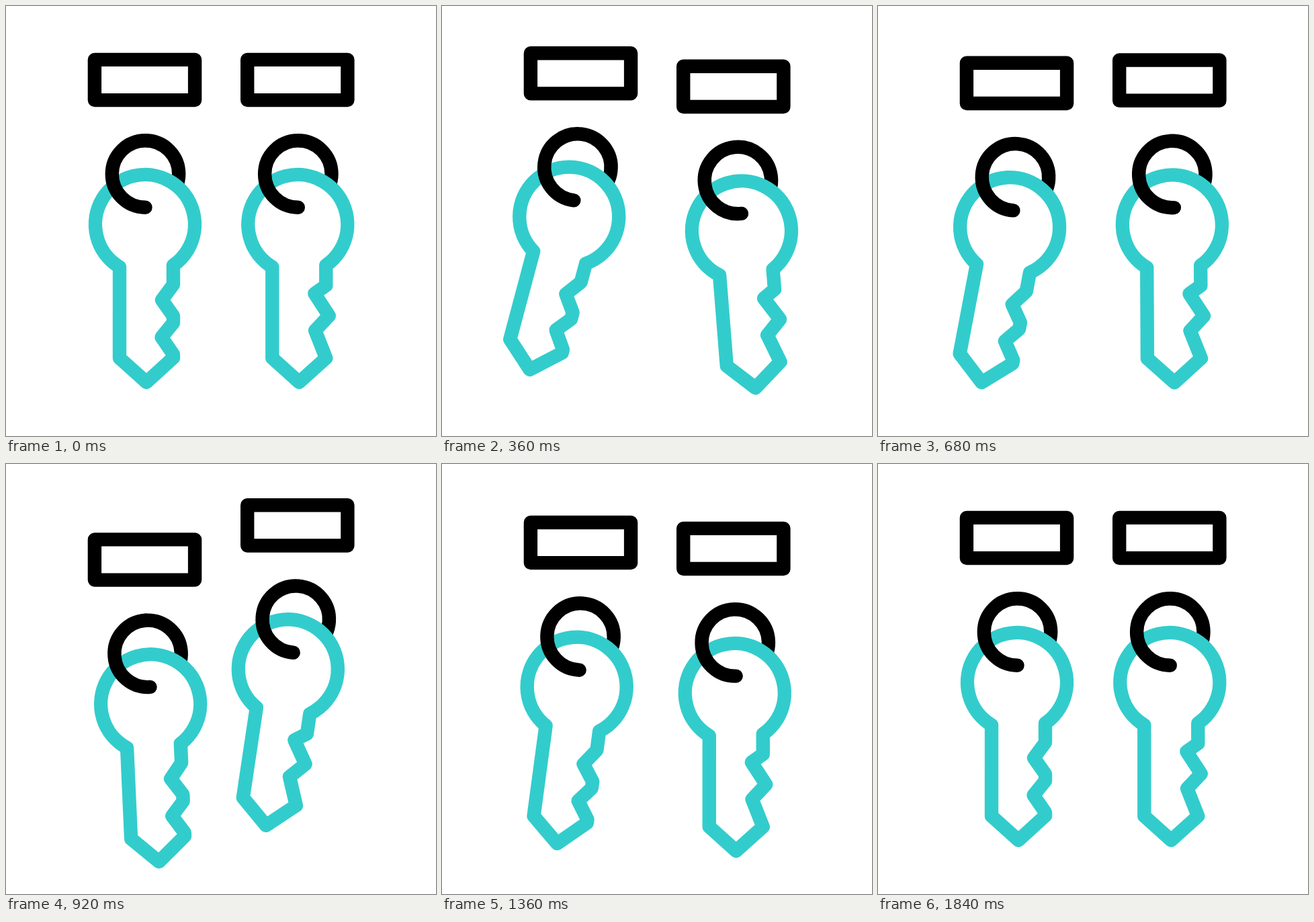
Recreate the animation shown at these times as an HTML page with a canvas. Size 640 by 640 pixels, loop 2 s.

```html
<!DOCTYPE html>
<html lang="en">
<head>
<meta charset="utf-8">
<title>Swinging keys</title>
<style>
  html, body { margin: 0; width: 100%; height: 100%; overflow: hidden; background: #fff; }
  canvas { display: block; width: 100vmin; height: 100vmin; }
</style>
</head>
<body>
<canvas id="stage" width="640" height="640"></canvas>
<script>
const ctx = document.getElementById('stage').getContext('2d');
const LOOP = 2000, STEP = 40;
const BLACK = '#000', TEAL = '#33cccc';
const RAD = Math.PI / 180;
const TIMES = [80, 480, 960, 1400, 1840];

// Each list holds the value at the matching entry of TIMES.
const sets = [
  {
    x: 0,
    lift: [0, -12.4, 33.4, 6.4, 0],
    ring: [0, 8.2, -4.3, 1.8, 0],
    key: [0, 19.05, -3, 7.9, 0],
    pivot: 299,
    teeth: [[249, 414.5], [232, 437.5], [249, 461.5], [249, 471.5],
            [231.5, 493], [249, 518.5], [249, 523.5]]
  },
  {
    x: 227.3,
    lift: [0, 12.6, -19.3, 16.8, 0],
    ring: [0, -8.2, 4.3, -1.8, 0],
    key: [0, -5.8, 8.8, -0.2, 0],
    pivot: 252,
    teeth: [[249, 416], [232, 428], [253.5, 461], [232.8, 483], [249, 524]]
  }
];

function valueAt(list, t) {
  if (t <= TIMES[0]) return list[0];
  for (let i = 1; i < TIMES.length; i++) {
    if (t < TIMES[i]) {
      const u = (t - TIMES[i - 1]) / (TIMES[i] - TIMES[i - 1]);
      return list[i - 1] + (list[i] - list[i - 1]) * u * u * (3 - 2 * u);
    }
  }
  return list[list.length - 1];
}

function rotateAt(x, y, deg) {
  ctx.translate(x, y);
  ctx.rotate(deg * RAD);
  ctx.translate(-x, -y);
}

function ringArc(from, to, cap) {
  ctx.lineCap = cap;
  ctx.strokeStyle = BLACK;
  ctx.beginPath();
  ctx.arc(207.5, 250, 49.7, from * RAD, to * RAD);
  ctx.stroke();
}

function drawKey(teeth) {
  ctx.strokeStyle = TEAL;
  ctx.beginPath();
  ctx.arc(207, 325, 74, Math.atan2(63.5, -38), Math.atan2(61, 42));
  for (const [x, y] of teeth) ctx.lineTo(x, y);
  ctx.lineTo(209, 560);
  ctx.lineTo(169, 524);
  ctx.closePath();
  ctx.stroke();
}

function drawSet(s, t) {
  const ring = valueAt(s.ring, t);
  ctx.save();
  ctx.translate(s.x, valueAt(s.lift, t));
  ctx.strokeStyle = BLACK;
  ctx.strokeRect(131.9, 79.9, 149.2, 60.2);

  rotateAt(207.5, 200, ring);
  ringArc(-90, 23, 'butt');
  ctx.save();
  rotateAt(207.5, s.pivot, valueAt(s.key, t) - ring);
  drawKey(s.teeth);
  ctx.restore();
  ringArc(90, 270, 'round');
  ctx.restore();
}

function frame() {
  const t = Math.floor((performance.now() % LOOP) / STEP) * STEP;
  ctx.fillStyle = '#fff';
  ctx.fillRect(0, 0, 640, 640);
  ctx.lineWidth = 20.4;
  ctx.lineJoin = 'round';
  for (const s of sets) drawSet(s, t);
  requestAnimationFrame(frame);
}
frame();
</script>
</body>
</html>
```
